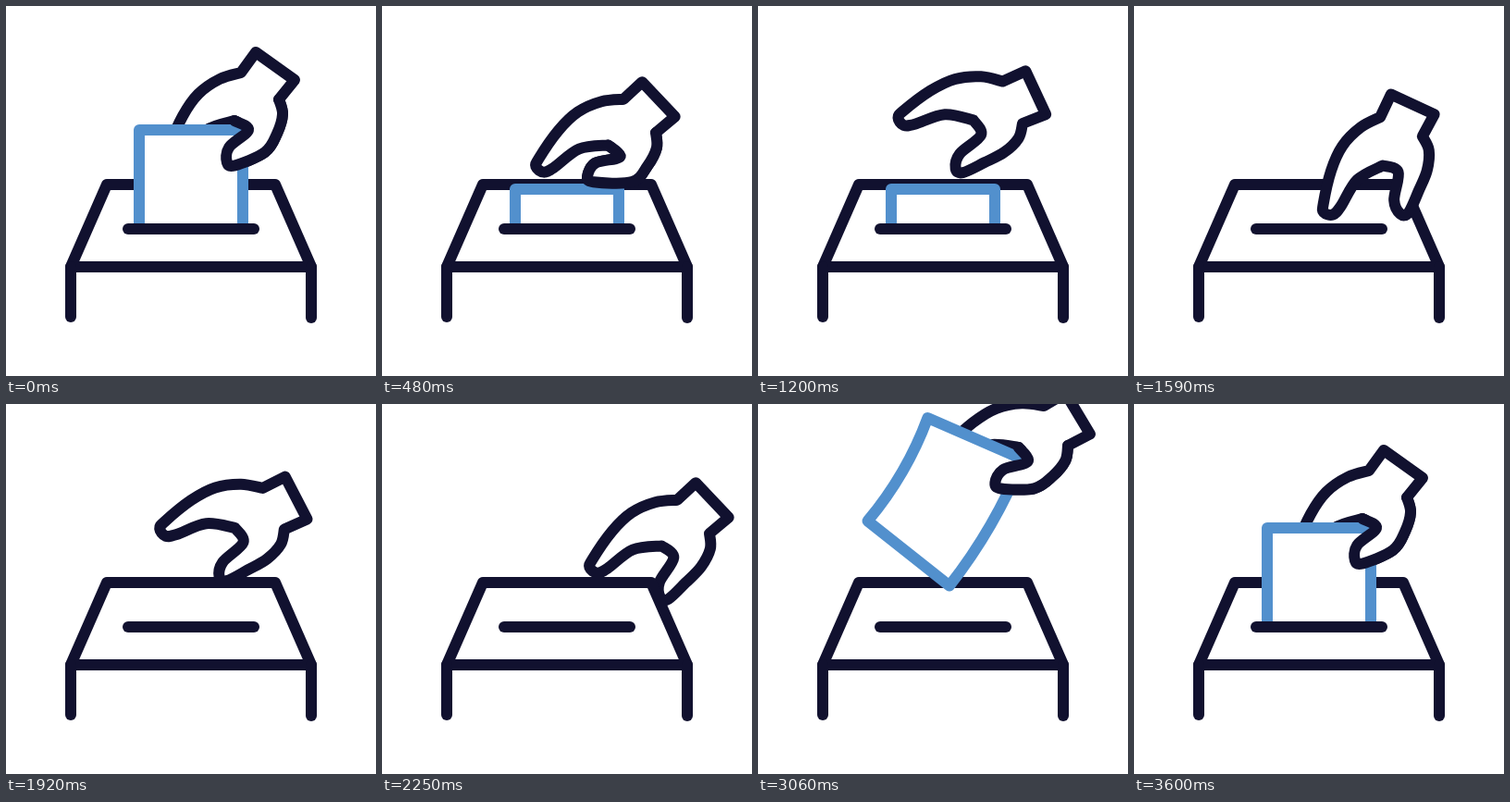
These frames come from a looping animation (400x400 px, 3.63 s). An HTML page with a canvas:

```html
<!DOCTYPE html>
<html lang="en">
<head>
<meta charset="utf-8">
<title>Ballot box</title>
<style>
  html, body { margin: 0; width: 100%; height: 100%; overflow: hidden; background: #fff; }
  canvas { display: block; width: 400px; height: 400px; }
</style>
</head>
<body>
<canvas id="stage" width="400" height="400"></canvas>
<script>
const ctx = document.getElementById('stage').getContext('2d');
const LOOP = 3630, STEP = 30;
const NAVY = '#11112f', BLUE = '#5290cd';
const RAD = Math.PI / 180;

// The hand, measured from the notch below its wrist.
const WRIST = [[-41, -29], [-25, -51], [17, -21], [0, 0]];
const HEEL = [[0, 0], [4, 16], [-2, 37], [-15, 57]];
const THUMB = [[-30, 78], [-39, 78], [-43, 62]];
const CROTCH = [[-33, 33], [-48, 23]];
const FINGERS = [[-48, 23], [-78, 33], [-101, 58], [-111, 65], [-120, 61],
  [-119, 52], [-104, 18], [-87, -6], [-64, -22], [-41, -29]];
const THUMB_JOINT = [-22, 29];

// time, x, y and turn of the hand
const MOVES = [
  [0, 295, 101, 0],
  [330, 295, 165, 0],      // paper pushed in
  [480, 296, 137, 11],     // let go
  [1050, 277, 110, 31],    // raised
  [1200, 286, 127, 29.5],
  [1610, 312, 141, -11],   // pressed down
  [1980, 300, 135, 30],
  [2250, 354, 140, 11],    // leaving
  [2520, 560, 230, -2],
  [2590, 630, 40, 32],     // back with a new paper
  [3060, 335, 45, 23.5],
  [3270, 317, 70, 12.5],
  [3570, 295, 101, 0]
];

const mix = (a, b, k) => a + (b - a) * k;

function smooth(t, from, to) {
  const k = Math.min(1, Math.max(0, (t - from) / (to - from)));
  return k * k * (3 - 2 * k);
}

function turn([x, y], deg, [ox, oy] = [0, 0]) {
  const c = Math.cos(deg * RAD), s = Math.sin(deg * RAD);
  const u = x - ox, v = y - oy;
  return [ox + u * c - v * s, oy + u * s + v * c];
}

// Monotone cubic interpolation of one column of MOVES.
const slope = (i, c) => (MOVES[i + 1][c] - MOVES[i][c]) / (MOVES[i + 1][0] - MOVES[i][0]);
function tangent(i, c) {
  if (i === 0 || i === MOVES.length - 1) return 0;
  const a = slope(i - 1, c), b = slope(i, c);
  return a * b > 0 ? 2 * a * b / (a + b) : 0;
}
function track(t, c) {
  let i = 0;
  while (i < MOVES.length - 2 && t >= MOVES[i + 1][0]) i++;
  const p = MOVES[i], q = MOVES[i + 1];
  const d = q[0] - p[0], k = Math.min(1, (t - p[0]) / d), k2 = k * k, k3 = k2 * k;
  return mix(p[c], q[c], 3 * k2 - 2 * k3)
    + d * (tangent(i, c) * (k3 - 2 * k2 + k) + tangent(i + 1, c) * (k3 - k2));
}

// Adds a smooth curve through the points, from the first to the last.
function curve(path, pts) {
  path.lineTo(...pts[0]);
  for (let i = 0; i < pts.length - 1; i++) {
    const a = pts[i], b = pts[i + 1];
    const before = pts[i - 1] || a, after = pts[i + 2] || b;
    path.bezierCurveTo(
      a[0] + (b[0] - before[0]) / 6, a[1] + (b[1] - before[1]) / 6,
      b[0] - (after[0] - a[0]) / 6, b[1] - (after[1] - a[1]) / 6,
      b[0], b[1]);
  }
}

function paint(path, color = NAVY, fill = true) {
  ctx.fillStyle = '#fff';
  ctx.strokeStyle = color;
  if (fill) ctx.fill(path);
  ctx.stroke(path);
}

function line(...pts) {
  const path = new Path2D();
  pts.forEach(p => path.lineTo(...p));
  paint(path, NAVY, false);
}

function drawBox() {
  paint(new Path2D('M109 193H291L330 282H70Z'));
  line([70, 282], [70, 336]);
  line([330, 282], [330, 337]);
}

const drawSlot = () => line([132, 241], [268, 241]);

const isHeld = t => t <= 330 || t > 2550;

function handAt(t) {
  const x = track(t, 1), y = track(t, 2), a = track(t, 3);
  const curl = t > 2550 ? 22 : 22 + 12 * smooth(t, 330, 480) - 34 * smooth(t, 480, 1050);
  const place = pts => pts.map(p => {
    const [u, v] = turn(p, a);
    return [x + u, y + v];
  });
  const tip = THUMB.map(p => turn(p, curl, THUMB_JOINT));
  return {
    wrist: place(WRIST),
    thumb: place([...HEEL, ...tip, ...CROTCH]),
    fingers: place(FINGERS)
  };
}

function drawHand({ wrist, thumb, fingers }) {
  const path = new Path2D();
  wrist.forEach(p => path.lineTo(...p));
  curve(path, thumb);
  curve(path, fingers);
  path.closePath();
  paint(path);
}

function drawThumb({ thumb }) {
  const path = new Path2D();
  curve(path, thumb);
  paint(path);
}

function drawPaper(t) {
  const held = isHeld(t);
  const x = held ? track(t, 1) : 295;
  const y = held ? track(t, 2) : 165 + 52 * smooth(t, 1330, 1570);
  const a = held ? track(t, 3) : 0;
  const bend = t > 2550 ? 1 - smooth(t, 3200, 3540) : 0;
  const at = (u, v) => {
    const [dx, dy] = turn([u, v], a);
    return [x + dx, y + dy];
  };
  const tl = at(-151, 33), tr = at(-39, 33);
  const br = at(-39 - 18 * bend, 161 + 29 * bend), bl = at(-151 - 15 * bend, 161);
  const bow = (p, q) => [(p[0] + q[0]) / 2 + 10 * bend, (p[1] + q[1]) / 2 + 5 * bend];

  const path = new Path2D();
  path.moveTo(...tl);
  path.lineTo(...tr);
  path.quadraticCurveTo(...bow(tr, br), ...br);
  path.lineTo(...bl);
  path.quadraticCurveTo(...bow(bl, tl), ...tl);
  path.closePath();

  // Everything below the slot is inside the box.
  ctx.save();
  ctx.beginPath();
  ctx.rect(0, 0, 400, 240);
  ctx.clip();
  paint(path, BLUE);
  ctx.restore();
}

function draw(t) {
  ctx.fillStyle = '#fff';
  ctx.fillRect(0, 0, 400, 400);
  ctx.lineWidth = 12;
  ctx.lineCap = ctx.lineJoin = 'round';

  const hand = handAt(t);
  if (t < 700 || t > 2550) {
    drawBox();
    drawHand(hand);
    drawPaper(t);
    drawThumb(hand);
    drawSlot();
  } else if (t < 1980) {
    drawBox();
    if (t < 1580) drawPaper(t);
    drawSlot();
    drawHand(hand);
  } else {
    drawHand(hand);
    drawBox();
    drawSlot();
  }
}

const start = performance.now();
function tick() {
  const t = (performance.now() - start) % LOOP;
  draw(Math.floor(t / STEP) * STEP);
  requestAnimationFrame(tick);
}
tick();
</script>
</body>
</html>
```
